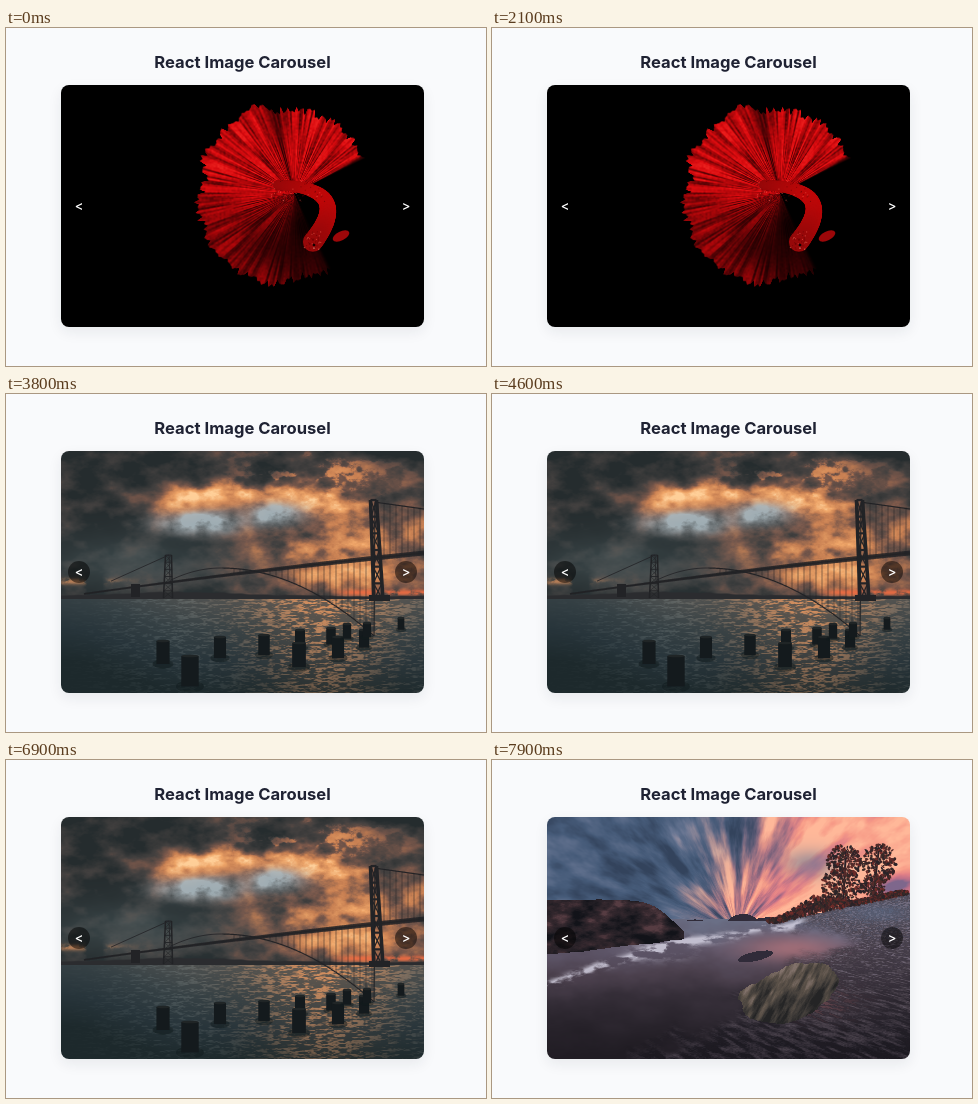
Animation of 480x338 px, one loop 8000 ms. Source, as an HTML page with a canvas:

```html
<!DOCTYPE html>
<html lang="en">
<head>
<meta charset="utf-8">
<title>React Image Carousel</title>
<style>
  html, body { margin: 0; width: 100%; height: 100%; overflow: hidden; background: #f9fafc; }
  h1 {
    position: absolute; left: 0; top: 22px; width: 473px; margin: 0;
    font: 700 16.6px/24px Inter, "Open Sans", sans-serif;
    color: #1f2233; text-align: center; white-space: nowrap;
  }
  .card {
    position: absolute; left: 55px; top: 57px; width: 363px; height: 242px;
    border-radius: 8px; box-shadow: 0 5px 14px rgba(30, 34, 51, .08);
  }
  canvas {
    position: absolute; inset: 0; border-radius: 8px;
    opacity: 0; animation: 8s step-end infinite;
  }
  #fish { animation-name: first; }
  #bridge { animation-name: second; }
  #beach { animation-name: third; }
  @keyframes first { 0% { opacity: 1; } 31.25%, 100% { opacity: 0; } }
  @keyframes second { 0% { opacity: 0; } 31.25% { opacity: 1; } 93.75%, 100% { opacity: 0; } }
  @keyframes third { 0% { opacity: 0; } 93.75%, 100% { opacity: 1; } }
  .arrow {
    position: absolute; top: 110px; width: 22px; height: 22px; border-radius: 50%;
    background: rgba(0, 0, 0, .5); color: #fff;
    font: 500 13px/22px Inter, "Open Sans", sans-serif; text-align: center;
  }
  .prev { left: 7px; }
  .next { right: 7px; }
</style>
</head>
<body>
<h1>React Image Carousel</h1>
<div class="card">
  <canvas id="fish" width="363" height="242"></canvas>
  <canvas id="bridge" width="363" height="242"></canvas>
  <canvas id="beach" width="363" height="242"></canvas>
  <div class="arrow prev">&lt;</div>
  <div class="arrow next">&gt;</div>
</div>
<script>
const LEFT = 55, TOP = 57, { PI, sin, cos, exp, hypot, floor } = Math;

let seed = 7;
const rnd = (a = 0, b = 1) => {
  seed = (seed * 16807) % 2147483647;
  return a + (b - a) * seed / 2147483647;
};

// Smooth value noise on a repeating 64 x 64 lattice.
const lattice = Float32Array.from({ length: 4096 }, () => rnd());
const at = (i, j) => lattice[(i & 63) + ((j & 63) << 6)];
function noise(x, y) {
  const i = floor(x), j = floor(y);
  let u = x - i, v = y - j;
  u *= u * (3 - 2 * u);
  v *= v * (3 - 2 * v);
  const a = at(i, j), b = at(i, j + 1);
  const top = a + (at(i + 1, j) - a) * u, low = b + (at(i + 1, j + 1) - b) * u;
  return top + (low - top) * v;
}
function fbm(x, y) {
  let sum = 0;
  for (let k = 0, w = .5; k < 5; k++, w /= 2, x = x * 2 + 5, y = y * 2 + 9)
    sum += w * noise(x, y);
  return clamp((sum - .484) * 1.7 + .5);
}

const clamp = v => Math.min(1, Math.max(0, v));
const step = (a, b, v) => { const t = clamp((v - a) / (b - a)); return t * t * (3 - 2 * t); };
const bell = d => exp(-d * d);
const bump = (x, y, cx, cy, rx, ry) => bell((x - cx) / rx) * bell((y - cy) / ry);
const mix = (a, b, t) => [a[0] + (b[0] - a[0]) * t, a[1] + (b[1] - a[1]) * t, a[2] + (b[2] - a[2]) * t];
const rgb = hex => [1, 3, 5].map(i => parseInt(hex.slice(i, i + 2), 16));
function ramp(...hexes) {
  const colors = hexes.map(rgb), last = colors.length - 1;
  return t => {
    const p = clamp(t) * last, i = Math.min(floor(p), last - 1);
    return mix(colors[i], colors[i + 1], p - i);
  };
}

// Fills a canvas from color(x, y), then leaves it in stage coordinates.
function paint(id, color) {
  const c = document.getElementById(id).getContext('2d');
  const { width, height } = c.canvas, img = c.createImageData(width, height);
  for (let y = 0, k = 0; y < height; y++)
    for (let x = 0; x < width; x++, k += 4) {
      img.data.set(color(x + LEFT, y + TOP), k);
      img.data[k + 3] = 255;
    }
  c.putImageData(img, 0, 0);
  c.translate(-LEFT, -TOP);
  return c;
}
function oval(c, x, y, rx, ry, color, turn = 0) {
  c.fillStyle = color;
  c.beginPath();
  c.ellipse(x, y, rx, ry, turn, 0, 7);
  c.fill();
}
function line(c, x0, y0, x1, y1, width) {
  c.lineWidth = width;
  c.beginPath();
  c.moveTo(x0, y0);
  c.lineTo(x1, y1);
  c.stroke();
}

function drawFish() {
  const black = [0, 0, 0];
  const red = ramp('#080000', '#4a0204', '#a00508', '#da0b0f', '#f22a25');
  // One fan of fin rays around the body, ragged at the rim.
  const c = paint('fish', (x, y) => {
    const dx = x - 288, dy = y - 165, r = hypot(dx, dy);
    if (r > 112) return black;
    const a = (Math.atan2(dy, dx) + 2 * PI) % (2 * PI);
    const rim = 89 - 7 * cos(a) + 10 * (noise(a * 4, 3) - .5) + 8 * (noise(a * 38, 9) - .5);
    const inside = step(rim, rim - 2, r) * step(1.1, 1.25, a) * step(5.83, 5.75, a);
    let v = .28 + .6 * noise(a * 42, r / 40) + .15 * (noise(x / 2, y / 2) - .5);
    v *= 1 - .3 * step(3.3, 2.6, a);
    v *= 1 - .6 * bump(x, y, 272, 222, 38, 30);
    v *= 1 - .85 * bump(x, y, 297, 198, 17, 24);
    v *= 1 - .55 * bell((a - 4.45) / .09);
    v *= 1 - .5 * step(1.9, 1.3, a);
    return mix(black, red(v), inside);
  });

  // The body curls along a quadratic arc from tail to head.
  for (let t = 0; t <= 1; t += .01) {
    const u = 1 - t, x = u * u * 272 + 2 * u * t * 350 + t * t * 306;
    const y = u * u * 157 + 2 * u * t * 160 + t * t * 215, r = 5 + 5 * t;
    oval(c, x, y, r, r, `rgb(${150 + 40 * sin(PI * t)},8,9)`);
    oval(c, x + 2, y - 1, r * .5, r * .5, `rgba(235,45,38,${.22 * sin(PI * t)})`);
  }
  for (let i = 0; i < 110; i++) {
    const head = i % 2;
    oval(c, rnd(head ? 298 : 265, head ? 315 : 320), rnd(head ? 203 : 152, head ? 222 : 174),
      .6, .6, i % 3 ? '#58020380' : '#ff6a5a90');
  }
  oval(c, 308, 217, 1.4, 1.3, '#130000');
  oval(c, 308, 220, .8, .6, '#ffc2a8');
  oval(c, 335, 208, 9, 4.5, '#9c0709', -.45);
}

function drawBridge() {
  const sky = ramp('#252c2e', '#43403f', '#79574a', '#c77f52', '#eea467', '#ffcf98');
  const sea = ramp('#4b4f4f', '#354044', '#27343a', '#1d292c');
  const [teal, blue, gold, glint, hill, ember] =
    ['#4b5a5d', '#a9b9c0', '#dd925e', '#667274', '#2b2c2f', '#ee6c42'].map(rgb);

  const c = paint('bridge', (x, y) => {
    if (y > 204) {
      const depth = (y - 204) / 95, n = noise(x / 6, y / 1.4) * .7 + noise(x / 2, y) * .3;
      const sheen = bell((x - 318) / (78 - 22 * depth)) * (1 - .65 * depth);
      let water = sea(depth + .35 * step(190, 55, x));
      water = mix(water, glint, .55 * step(.45, .85, n) * (1 - .7 * depth) * step(40, 200, x));
      return mix(water, gold, sheen * (.18 + .8 * step(.38, .75, n)));
    }
    const n = fbm(x / 42, y / 26), fine = fbm(x / 15 + 7, y / 10);
    const arc = 124 - 24 * sin(PI * (x - 140) / 230);
    const band = bell((y - arc + 16 * (n - .5)) / 13) * step(135, 175, x) * step(385, 310, x);
    const sun = bump(x, y, 345, 158, 95, 48);
    const plume = bump(x, y, 242 + 10 * (n - .5), 138, 13, 25);
    const smoke = bump(x, y, 238, 84, 22, 22);
    const fleck = step(.6, .85, fine) * bump(x, y, 310, 80, 65, 20);
    const v = .1 + .62 * sun + .55 * band + .3 * plume + .35 * fleck + .12 * smoke
      + (n - .5) * .45 + (fine - .5) * (.18 + .3 * (band + sun));
    let color = mix(sky(v), teal, .75 * bump(x, y, 125, 167, 105, 28) * (.5 + n / 2));
    const gap = bump(x, y, 195, 128, 38, 10) + bump(x, y, 270, 119, 26, 10);
    color = mix(color, blue, clamp(gap * 1.5 * (.35 + fine)) * .9);
    color = mix(color, gold, .75 * bump(x, y, 65, 187, 45, 3) * step(.35, .7, fine));
    color = mix(color, ember, .9 * bell((y - 198) / 3) * step(320, 350, x) * step(.2, .5, fine));
    return mix(color, hill, step(-1, 1, y - 202 + 4 * bell((x - 175) / 80) + noise(x / 9, 1)));
  });

  c.strokeStyle = c.fillStyle = '#222326';
  const deck = x => 159 + (418 - x) * .1 + .00006 * (418 - x) ** 2;
  // Both main cables hang as parabolas above the deck.
  const cable = x => x > 368 ? 108 + (x - 368) * .14
    : x > 163 ? 174 + (x < 215 ? .0048 : .0029) * (x - 215) ** 2
    : 161 + (163 - x) * .45;
  for (let x = 105; x < 418; x++) {
    line(c, x, cable(x), x + 1, cable(x + 1), x > 215 ? 1.2 : .8);
    if (x > 225 && x % 6 === 0) line(c, x, cable(x), x, deck(x), .5);
  }
  for (let x = 78; x < 418; x++)
    line(c, x, deck(x), x + 1, deck(x + 1), 1.8 + 3 * step(78, 400, x));
  c.fillRect(125, 190, 9, 13);

  function tower(x0, top, x1, base, half, width) {
    const spot = (t, side) => x0 + (x1 - x0) * t + side * half * (1 + .5 * t);
    for (const side of [-1, 1]) line(c, spot(0, side), top, spot(1, side), base, width);
    for (let k = 0; k < 6; k++) {
      const y = t => top + (base - top) * t, a = k / 6, b = (k + 1) / 6;
      line(c, spot(a, -1), y(a), spot(a, 1), y(a), width * .6);
      line(c, spot(a, -1), y(a), spot(b, 1), y(b), width * .35);
      line(c, spot(a, 1), y(a), spot(b, -1), y(b), width * .35);
    }
  }
  tower(162.5, 161, 162, 204, 3, 1.5);
  tower(367.5, 106, 372.5, 206, 3, 3.6);
  c.fillRect(363, 201, 21, 6);

  // Nearer piles stand lower and are larger.
  const piles = [[157, 247], [184, 262], [214, 243], [258, 241], [294, 236], [293, 249],
    [325, 234], [332, 243], [341, 230], [358, 236], [361, 229], [395, 224]];
  for (const [x, y] of piles) {
    const w = (y - 200) * .28, h = w * 1.75;
    oval(c, x, y + h, w * .8, w * .35, '#10191c80');
    c.fillStyle = '#141a1d';
    c.fillRect(x - w / 2, y, w, h);
    oval(c, x, y, w / 2, 1.3, '#202526');
  }
}

function drawBeach() {
  const cool = ramp('#33435c', '#465b79', '#63728f', '#8288a3');
  const warm = ramp('#7e678c', '#bd7089', '#e28086', '#f79b87', '#ffb899');
  const sand = ramp('#6a6f86', '#5e5669', '#4b404d', '#352e38', '#28232b', '#201c23');
  const stone = ramp('#17161d', '#302b34', '#4b434d', '#756c7c');
  const cliff = ramp('#121319', '#241f25', '#35282e', '#563c42');
  const moss = ramp('#242425', '#3f3b38', '#5c5249', '#81716a');
  const [foam, pink, isle] = ['#d2cfdf', '#c07a80', '#302b39'].map(rgb);

  paint('beach', (x, y) => {
    const dx = x - 245, dy = y - 172, n = fbm(x / 30, y / 18);
    const bank = 158 - (x - 300) * .22 + 2 * (n - .5);
    let color;
    if (y < Math.min(159, x > 300 ? bank : 159)) {
      // Clouds fan out from a point on the horizon.
      const streak = fbm(Math.atan2(dy, dx) * 7 + 20, hypot(dx, dy) / 55);
      const hue = step(205, 305, x + 90 * (streak - .5) + 22 * bell((y - 140) / 25));
      const light = .38 + 1.1 * (streak - .5) + .3 * bump(x, y, 310, 78, 70, 40) + .25 * (n - .5);
      color = mix(cool(light), warm(light + .12), hue);
      color = mix(color, cool(.75), .6 * bump(x, y, 318, 103, 28, 14));
    } else {
      const near = clamp((y - 159) / 140), size = 1.6 + 4.5 * near;
      color = sand(near * 1.05 + .12 * (n - .5));
      color = mix(color, pink, .65 * bump(x, y, 300, 188, 50, 13) + .55 * bump(x, y, 330, 243, 36, 17));
      const pebble = noise(x / size, y / size * 1.7) * .75 + noise(x / 1.5, y) * .25;
      const shore = y < 185 ? 305 + (y - 159) * 1.6 : 347 - (y - 185) * 1.7;
      const cover = step(-25, 30, x - shore + 70 * (n - .5));
      color = mix(color, stone(pebble + .2 - .55 * near), cover * (.35 + .55 * step(.2, .5, pebble)));
      color = mix(color, cool(.6), .5 * bump(x, y, 385, 152, 35, 9));
    }
    for (const [cx, w, h] of [[250, 14, 7], [277, 15, 4], [203, 9, 2]])
      if (y < 161 && hypot((x - cx) / w, (y - 161) / h) < .9 + .2 * n) color = isle;

    const wave = (x < 195 ? 222 - .3 * (x - 55) : 180 - .17 * (x - 195)) + 7 * (noise(x / 13, 4) - .5);
    const spray = fbm(x / 12, y / 5);
    const surf = bell((y - wave) / 4.5) * step(322, 300, x) + .9 * bump(x, y, 170, 188, 25, 10);
    color = mix(color, foam, clamp(surf * step(.3, .8, spray) * 1.1) * .85);

    const along = (x - 55) / 137;
    if (along < 1 && y > 138 + 33 * along ** 6 + 3 * n && y < 193 - 18 * along + 5 * n)
      color = cliff(fbm(x / 14, y / 8) * 1.1 - .25 * step(160, 190, y));

    if (hypot((x - 262) / 19, (y - 196 + (x - 262) * .2) / 5) < .8 + .4 * n) color = isle;
    const mx = x - 297, my = y - 233 + mx * .22;
    if (hypot(mx / 50, my / 26) < .82 + .34 * n) {
      const fur = fbm((x + y * .5) / 5, y / 16);
      color = moss(.42 + .9 * (fur - .5) - my / 75);
    }
    return color;
  });

  const c = document.getElementById('beach').getContext('2d');
  const leaves = ['#372427', '#522b2a', '#292328', '#6e2c29', '#352a28'];
  function foliage(x, y, w, h) {
    for (let i = 0; i < w * 13; i++) {
      const a = rnd(0, 2 * PI), r = Math.sqrt(rnd());
      oval(c, x + w * r * cos(a), y + h * r * sin(a), rnd(.7, 2.1), rnd(.6, 1.7),
        leaves[floor(rnd(0, leaves.length))], a);
    }
  }
  c.strokeStyle = '#272127';
  line(c, 351, 145, 354, 90, 2);
  line(c, 381, 138, 387, 88, 2);
  foliage(352, 102, 17, 17);
  foliage(350, 125, 21, 17);
  foliage(387, 103, 17, 20);
  foliage(382, 125, 13, 11);
  // Bushes grow taller toward the trees and thin out beyond them.
  for (let x = 282; x < 416; x += 8) {
    const h = 2 + 7 * bell((x - 325) / 22);
    foliage(x, 161 - (x - 290) * .22 - h, 7, h);
  }
}

drawFish();
drawBridge();
drawBeach();
</script>
</body>
</html>
```
